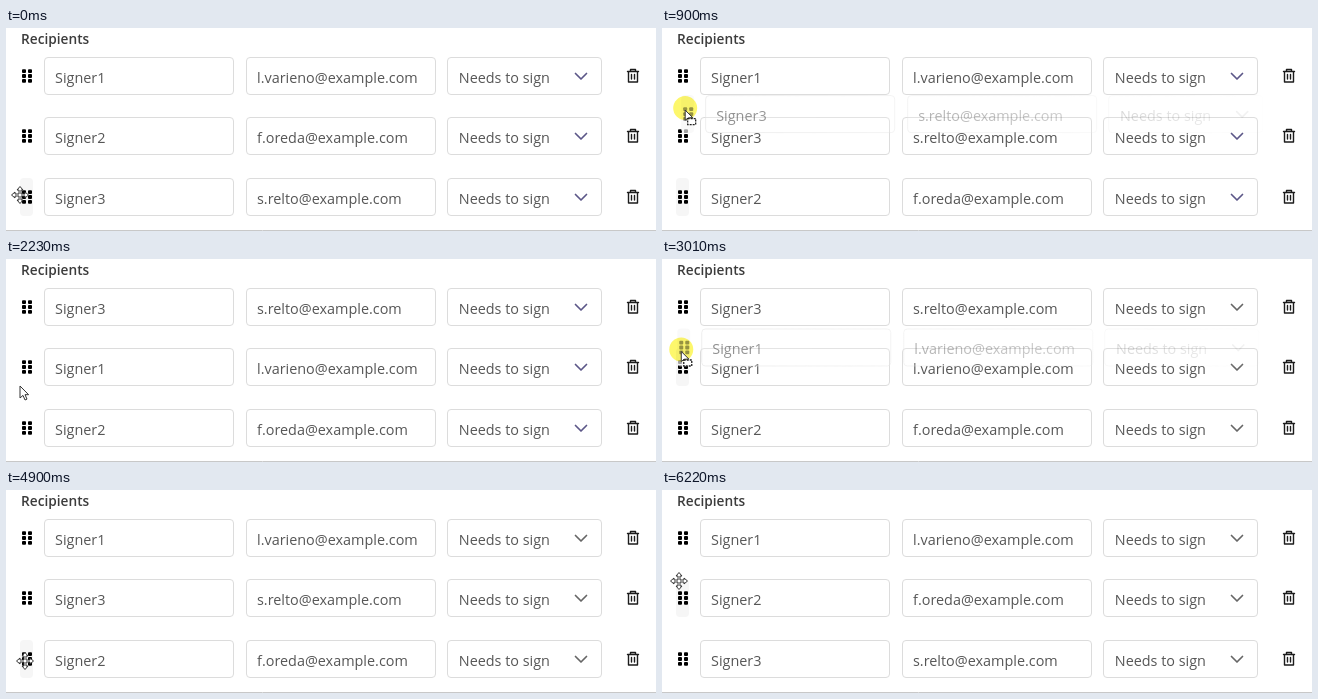
These frames come from a looping animation (650 px wide and 203 px high, 6.34 s). An HTML page:

```html
<!DOCTYPE html>
<html lang="en">
<head>
<meta charset="utf-8">
<title>Reorder recipients</title>
<style>
  html, body { margin: 0; width: 100%; height: 100%; overflow: hidden; background: #fff; }
  svg { display: block; width: 650px; height: 203px; }
  text { font: 14.4px "Open Sans", "Noto Sans", sans-serif; fill: #565656; }
  .title { font-size: 13.7px; font-weight: 600; fill: #3c3c3c; }
  .field { fill: #fff; stroke: #dcdcdc; }
  .hover { fill: #f6f6f6; }
  .chevron { fill: none; stroke: #666; stroke-width: 1.7; stroke-linecap: round; stroke-linejoin: round; }
  .fresh .chevron { stroke: #5c5788; }
  .trash { fill: none; stroke: #1c1c1c; stroke-width: 1.4; stroke-linejoin: round; stroke-linecap: round; }
  #ghost .field { fill-opacity: .4; stroke: #e6e6e6; }
  #ghost .dot { opacity: .6; }
  #ghost .trash { display: none; }
  #halo { fill: #fdf76c; mix-blend-mode: multiply; }
  .pointer { fill: #fff; stroke: #333; stroke-width: 1; stroke-linejoin: round; }
</style>
</head>
<body>
<svg viewBox="0 0 650 203">
  <defs>
    <linearGradient id="fade" gradientUnits="userSpaceOnUse" x1="0" x2="650" y1="0" y2="0">
      <stop offset=".08" stop-color="#fff" stop-opacity=".66"/>
      <stop offset=".38" stop-color="#fff" stop-opacity=".45"/>
      <stop offset=".9" stop-color="#fff" stop-opacity=".08"/>
    </linearGradient>
    <mask id="fadeMask" maskUnits="userSpaceOnUse" x="0" y="-30" width="650" height="60">
      <rect y="-30" width="650" height="60" fill="url(#fade)"/>
    </mask>
  </defs>
  <text class="title" x="15" y="15.5">Recipients</text>
  <path d="M0 202.5H650" stroke="#c8c8c8"/>
  <g id="rows"></g>
  <g id="ghost" mask="url(#fadeMask)"></g>
  <g id="cursor">
    <circle id="halo" cy="-4" r="12"/>
    <path id="arrow" class="pointer" d="M0 0V12L3 9.4 5 14 7 13.1 5 8.7H8.6Z"/>
    <g id="drag">
      <path class="pointer" d="M0-2V8L3 5.8 7.5 5.5Z"/>
      <rect x="2.5" y="6.5" width="8" height="6" fill="#fff" stroke="#222" stroke-width="1.3" stroke-dasharray="2 1"/>
    </g>
    <path id="move" class="pointer" d="M0-8.5 3-5H1V-1H5V-3L8.5 0 5 3V1H1V5H3L0 8.5-3 5H-1V1H-5V3L-8.5 0-5-3V-1H-1V-5H-3Z"/>
  </g>
</svg>
<script>
const LOOP = 6340, TICK = 1000 / 9;
const TOP = 48, PITCH = 60.5, HANDLE = 17.5;
const $ = id => document.getElementById(id);

const signers = [
  ["Signer1", "l.varieno@example.com"],
  ["Signer2", "f.oreda@example.com"],
  ["Signer3", "s.relto@example.com"],
];

// Pointer glides; one with an id drags that signer until the next glide starts.
const home = { x: 14, y: 167 };
const glides = [
  { start: 100, end: 1440, x: 17, y: 37, bow: 8, id: 2 },
  { start: 1880, end: 2220, x: 14, y: 127 },
  { start: 2220, end: 2555, x: 19, y: 114 },
  { start: 2775, end: 3440, x: 20, y: 38, id: 0 },
  { start: 3995, end: 4555, x: 15, y: 187 },
  { start: 4555, end: 4885, x: 19, y: 171 },
  { start: 4950, end: 5555, x: 28, y: 94, id: 1 },
  { start: 5880, end: 6000, x: 17, y: 91 },
];

const slotY = slot => Math.floor(TOP + slot * PITCH);
const nearestSlot = y => Math.max(0, Math.min(2, Math.round((y - TOP) / PITCH)));
const ease = u => (1 - Math.cos(Math.PI * u)) / 2;

// Replays the glides up to time t and returns the whole state.
function stateAt(t) {
  let point = home, order = [0, 1, 2], drag = null;
  for (const g of glides.filter(g => g.start <= t)) {
    const u = ease(Math.min(1, (t - g.start) / (g.end - g.start)));
    const from = point;
    point = {
      x: from.x + (g.x - from.x) * u + (g.bow || 0) * Math.sin(Math.PI * u),
      y: from.y + (g.y - from.y) * u,
    };
    drag = null;
    if (g.id === undefined) continue;
    const slot = order.indexOf(g.id);
    drag = { id: g.id, slot, y: slotY(slot) + point.y - from.y };
    order = order.filter(id => id !== g.id);
    order.splice(nearestSlot(drag.y), 0, g.id);
  }
  return { point, order, drag };
}

// A row is drawn around y = 0.
function rowMarkup([name, mail]) {
  const box = (x, w) => `<rect class="field" x="${x}.5" y="-18.5" width="${w}" height="37" rx="3.5"/>`;
  let dots = "";
  for (const x of [16, 22])
    for (const y of [-6.8, -1.9, 3]) dots += `<rect class="dot" x="${x}" y="${y}" width="4" height="3.8" rx="1"/>`;
  return `<rect class="hover" x="14" y="-19" width="13" height="38" rx="4"/>${dots}
    ${box(38, 189)}${box(240, 189)}${box(441, 154)}
    <text x="49" y="6.5">${name}</text><text x="251" y="6.5">${mail}</text>
    <text x="452.8" y="6.5">Needs to sign</text>
    <path class="chevron" d="M569.5-2.5 575 3 580.5-2.5"/>
    <path class="trash" d="M621.5-4.5H632.5M624.5-4.5V-6.5H629.5V-4.5M622.5-4.5V6H631.5V-4.5M625.5-1.5V3M628.5-1.5V3"/>`;
}

$("rows").innerHTML = signers.map(s => `<g>${rowMarkup(s)}</g>`).join("");
$("ghost").innerHTML = rowMarkup(signers[0]);
const rows = [...$("rows").children];
const ghostTexts = $("ghost").querySelectorAll("text");

const place = (el, x, y) => el.setAttribute("transform", `translate(${x} ${y})`);
const show = (el, on) => { el.style.display = on ? "" : "none"; };

function draw(ms) {
  const t = Math.floor((ms % LOOP + 5) / TICK) * TICK;
  const { point, order, drag } = stateAt(t);
  const under = nearestSlot(point.y);
  const onHandle = Math.abs(point.y - slotY(under)) < HANDLE;
  const lit = drag ? drag.slot : onHandle ? under : -1;
  const mode = drag ? "drag" : onHandle ? "move" : "arrow";

  $("rows").classList.toggle("fresh", t < glides[3].start);
  order.forEach((id, slot) => {
    place(rows[id], 0, slotY(slot));
    show(rows[id].querySelector(".hover"), slot === lit);
  });

  show($("ghost"), drag);
  show($("halo"), drag);
  if (drag) {
    signers[drag.id].forEach((s, i) => { ghostTexts[i].textContent = s; });
    place($("ghost"), point.x - 18, drag.y);
  }
  place($("cursor"), point.x, point.y);
  for (const id of ["arrow", "drag", "move"]) show($(id), id === mode);
}

const start = performance.now();
function loop() {
  draw(performance.now() - start);
  requestAnimationFrame(loop);
}
loop();
</script>
</body>
</html>
```
